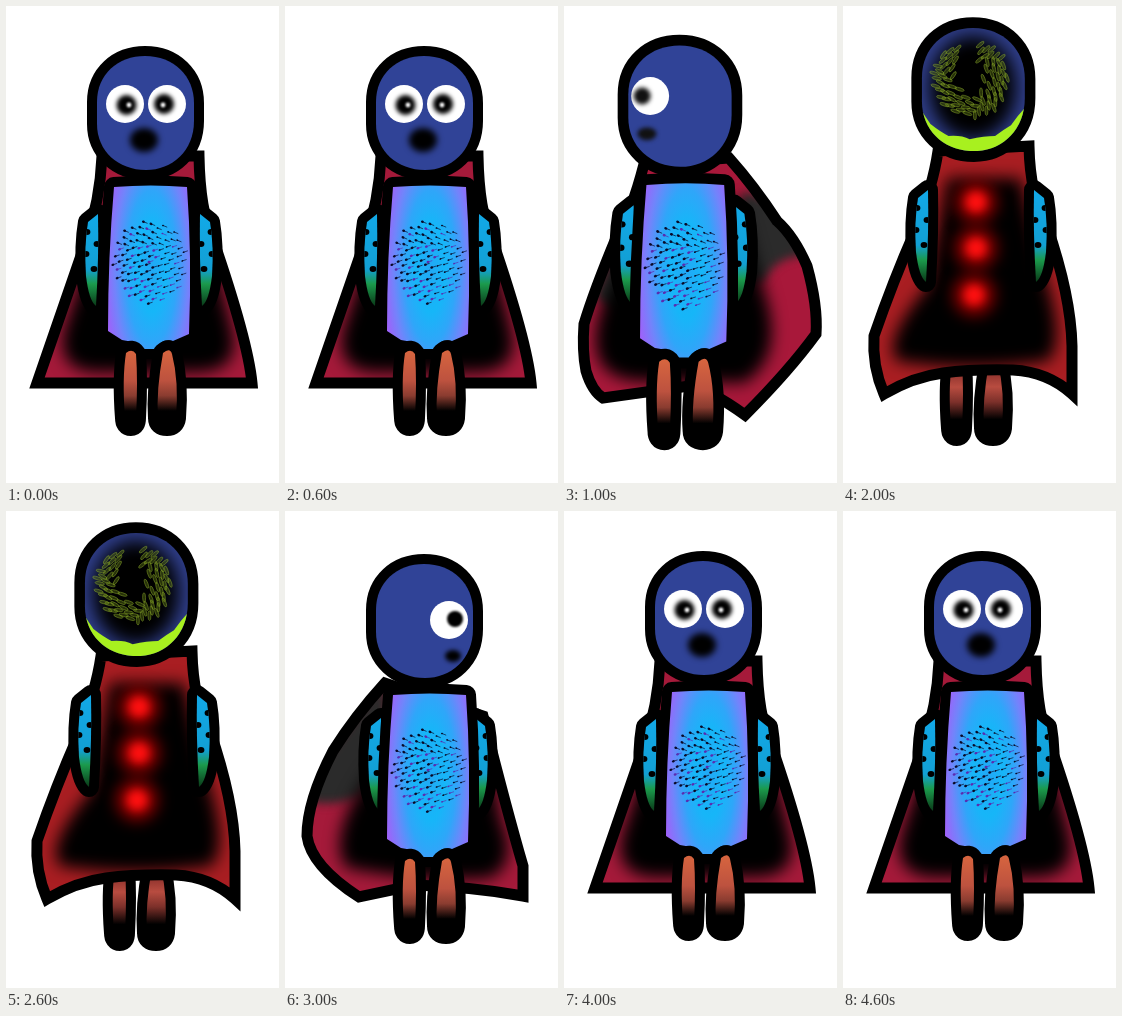
An HTML page that plays this animation: 273 px wide and 477 px high, repeating every 5000 ms.

```html
<!DOCTYPE html>
<html lang="en">
<head>
<meta charset="utf-8">
<title>Caped figure turning around</title>
<style>
  html, body { margin: 0; width: 100%; height: 100%; overflow: hidden; background: #fff; }
  svg { display: block; width: 100vw; height: 100vh; }
  .outline { stroke: #000; stroke-width: 20; stroke-linejoin: round; paint-order: stroke; }
</style>
</head>
<body>
<svg id="stage" viewBox="0 0 273 477"></svg>
<script>
const HEAD = 'M91 96C91 68 112 50 139 50C168 50 188 70 188 97V115C188 145 166 164 140 164C112 164 91 145 91 118Z';
const BODY = 'M108 181Q145 178 181 181Q186 250 183 328L167 335Q155 332 150 343H134Q128 335 116 334L102 325Q102 250 108 181Z';
const ARM = 'M82 216L92 208Q93 250 90 300Q83 295 80 270Q78 240 82 216Z';

const blur = s => `<filter id="b${s}" x="-60%" y="-60%" width="220%" height="220%" color-interpolation-filters="sRGB"><feGaussianBlur stdDeviation="${s}"/></filter>`;
const stops = list => list.map(([at, color]) => `<stop offset="${at}" stop-color="${color}"/>`).join('');
const gradient = (id, ...list) => `<linearGradient id="${id}" x2="0" y2="1">${stops(list)}</linearGradient>`;
const clip = (id, d) => `<clipPath id="${id}"><path d="${d}"/></clipPath>`;

const defs = `<defs>${[1, 2, 3, 4, 5, 8].map(blur).join('')}
  ${gradient('armFill', [0, '#12a9e8'], [.6, '#129fd4'], [.76, '#1b9a4c'], [1, '#0a3a18'])}
  ${gradient('legFill', [0, '#d7653f'], [.4, '#bd523f'], [.6, '#8a3c30'], [.8, '#000'])}
  ${gradient('backLegFill', [0, '#6a1c1c'], [.35, '#b84c40'], [.55, '#7c302a'], [.78, '#000'])}
  <radialGradient id="bodyFill" cx=".53" cy=".5" r=".6" gradientTransform="translate(0 -.25) scale(1 1.5)">
    ${stops([[0, '#22a8f6'], [.3, '#16b6f8'], [.52, '#2fa6f9'], [.75, '#7284fb'], [1, '#a55cfa']])}
  </radialGradient>
  ${clip('headClip', HEAD)}${clip('armClip', ARM)}</defs>`;

const group = (transform, ...parts) => `<g transform="${transform}">${parts.join('')}</g>`;
const shape = (d, fill) => `<path class="outline" d="${d}" fill="${fill}"/>`;
const soft = (d, s, fill = '#000') => `<path d="${d}" fill="${fill}" filter="url(#b${s})"/>`;
const oval = (x, y, rx, ry = rx, fill = '#000', s = 0) =>
  `<ellipse cx="${x}" cy="${y}" rx="${rx}" ry="${ry}" fill="${fill}" ${s ? `filter="url(#b${s})"` : ''}/>`;

const cape = (d, color, ...shades) => clip('capeClip', d) +
  `<path d="${d}" fill="${color}"/><g clip-path="url(#capeClip)">${shades.join('')}</g>` +
  `<path d="${d}" fill="none" stroke="#000" stroke-width="11"/>`;

function arms(inset = 0, dy = 0) {
  const spots = [[81, 226], [91, 238], [80, 248], [88, 263]].map(([x, y]) => oval(x, y, 3.4, 3)).join('');
  const arm = group(`translate(${inset} ${dy})`, shape(ARM, 'url(#armFill)'),
    `<g clip-path="url(#armClip)">${spots}</g>`);
  return arm + group('translate(286) scale(-1 1)', arm);
}

const legs = (fill = 'legFill') =>
  shape('M120 347Q126 342 130 348Q132 375 130 412Q130 420 125 420Q119 420 119 412Q116 372 120 347Z', `url(#${fill})`) +
  shape('M157 347Q164 341 166 348Q173 375 170 412Q169 420 161 420Q152 420 152 412Q150 385 157 347Z', `url(#${fill})`);

// Speckles packed in a spiral, each a dot with a thin tail
function speckles() {
  let out = '';
  for (let i = 0; i < 110; i++) {
    const a = i * 2.4, r = Math.sqrt(i / 110);
    const x = 143 + 37 * r * Math.cos(a), y = 256 + 42 * r * Math.sin(a);
    const tilt = y < 240 ? 22 : -18;
    const size = x < 150 ? 1.5 : 1;
    const color = i % 5 === 0 || (y > 275 && i % 2) ? '#5b2bb0' : '#0a0a28';
    out += group(`translate(${x.toFixed(1)} ${y.toFixed(1)}) rotate(${tilt})`,
      oval(0, 0, size, size * .8, color), `<path d="M0 0H4.5" stroke="${color}" stroke-width=".6"/>`);
  }
  return out;
}

const torso = () => shape(BODY, 'url(#bodyFill)') + speckles();
const head = (...face) => shape(HEAD, '#304397') + face.join('');

function backOfHead() {
  let leaves = '';
  for (let i = 0; i < 95; i++) {
    const a = i * 2.4, r = 12 + 23 * Math.sqrt(i / 95);
    const x = 137 + r * Math.cos(a), y = 97 + r * Math.sin(a);
    if (y < 90 && Math.abs(x - 134) < 9) continue;
    const sector = Math.floor(a / 1.05) % 6;
    const turn = sector * 60 + (sector % 2 ? 125 : 70) + i % 4 * 6;
    leaves += group(`translate(${x.toFixed(1)} ${y.toFixed(1)}) rotate(${turn})`,
      `<ellipse rx="4.5" ry="1.4" fill="#6f8c1c" fill-opacity=".35" stroke="#84a328" stroke-opacity=".75" stroke-width=".6"/>`);
  }
  return shape(HEAD, '#303f8c') + `<g clip-path="url(#headClip)">` +
    oval(139, 105, 41, 48, '#000', 8) + leaves +
    `<path d="M88 122Q94 132 99 139Q108 146 116 150Q128 149 136 153Q150 150 160 150Q168 144 175 140Q182 130 190 122V168H88Z" fill="#a8f01f"/></g>`;
}

const front = () =>
  cape('M96 150Q94 195 80 235L31 377H246Q242 335 207 233Q194 205 193 150Z', '#a51a3a',
    soft('M95 210L58 325Q50 364 90 366H190Q235 366 226 325L192 190Z', 8)) +
  arms() + torso() + legs() +
  head(oval(119, 98, 19, 19, '#fff'), oval(161, 98, 19, 19, '#fff'),
    oval(120.5, 99, 10, 10, '#000', 2), oval(158, 98, 10, 10, '#000', 2),
    oval(123, 99, 2.4, 2.4, '#fff', 1), oval(157, 99, 2.4, 2.4, '#fff', 1),
    oval(138, 134, 14, 12, '#000', 3));

const left = () =>
  cape('M80 158Q68 205 52 232Q30 285 20 318Q18 345 22 365Q28 385 39 392L125 380Q145 383 181 409Q225 365 252 328Q254 300 243 260Q230 230 213 215Q190 180 165 152Z', '#a8183a',
    soft('M180 185L222 200L240 250Q212 250 200 275L150 280Z', 5, '#2b2b2b'),
    soft('M60 220L30 290L60 310Z', 5, '#2b2b2b'),
    soft('M75 200L38 300Q15 372 75 375L180 377Q222 350 200 285L175 195Z', 8)) +
  group('translate(-32.6 -13.8) scale(1.065)', arms(4, -8), torso(), legs(),
    head(oval(111.5, 97.5, 17.8, 17.8, '#fff'), oval(104, 97.5, 8, 8, '#111', 2),
      oval(108.5, 133, 9, 6, '#111', 2)));

const back = () =>
  group('translate(-11 10)', legs('backLegFill')) +
  cape('M95 145Q90 180 72 225Q50 275 31 330Q29 360 41 388Q70 371 100 367Q130 363 170 364Q205 366 229 388V340Q228 290 204 220Q187 190 186 140Z', '#a91e22',
    soft('M104 172L85 280Q38 335 54 355Q130 366 205 355Q224 335 200 265L178 172Z', 8)) +
  group('translate(-5 0)', arms(-2, -24)) +
  [[133, 196], [133, 242], [131, 289]].map(([x, y]) =>
    oval(x, y, 20, 20, '#9a0000', 8) + oval(x, y, 10, 10, '#ff1010', 4)).join('') +
  group('translate(-17.5 -32) scale(1.06 1.08)', backOfHead());

const right = () =>
  cape('M100 172Q70 205 48 240Q22 290 22 325Q26 355 74 386L130 374Q190 376 238 385V355Q222 300 198 205Z', '#a51a3a',
    soft('M100 165L10 285Q40 300 75 285L105 240Z', 5, '#2b2b2b'),
    soft('M85 260Q40 330 62 357Q140 372 205 367Q234 352 216 310L195 200Z', 8)) +
  group('translate(0 3)', arms(4, -4), torso(), legs(),
    head(oval(164, 106, 19, 19, '#fff'), oval(170, 105, 8, 8, '#000', 1),
      oval(168, 142, 8, 6, '#000', 2)));

const poses = [front, left, back, right, front];
const stage = document.getElementById('stage');
let shown;

function tick() {
  const pose = poses[Math.floor(performance.now() / 1000) % poses.length];
  if (pose !== shown) {
    stage.innerHTML = defs + pose();
    shown = pose;
  }
  requestAnimationFrame(tick);
}
tick();
</script>
</body>
</html>
```
